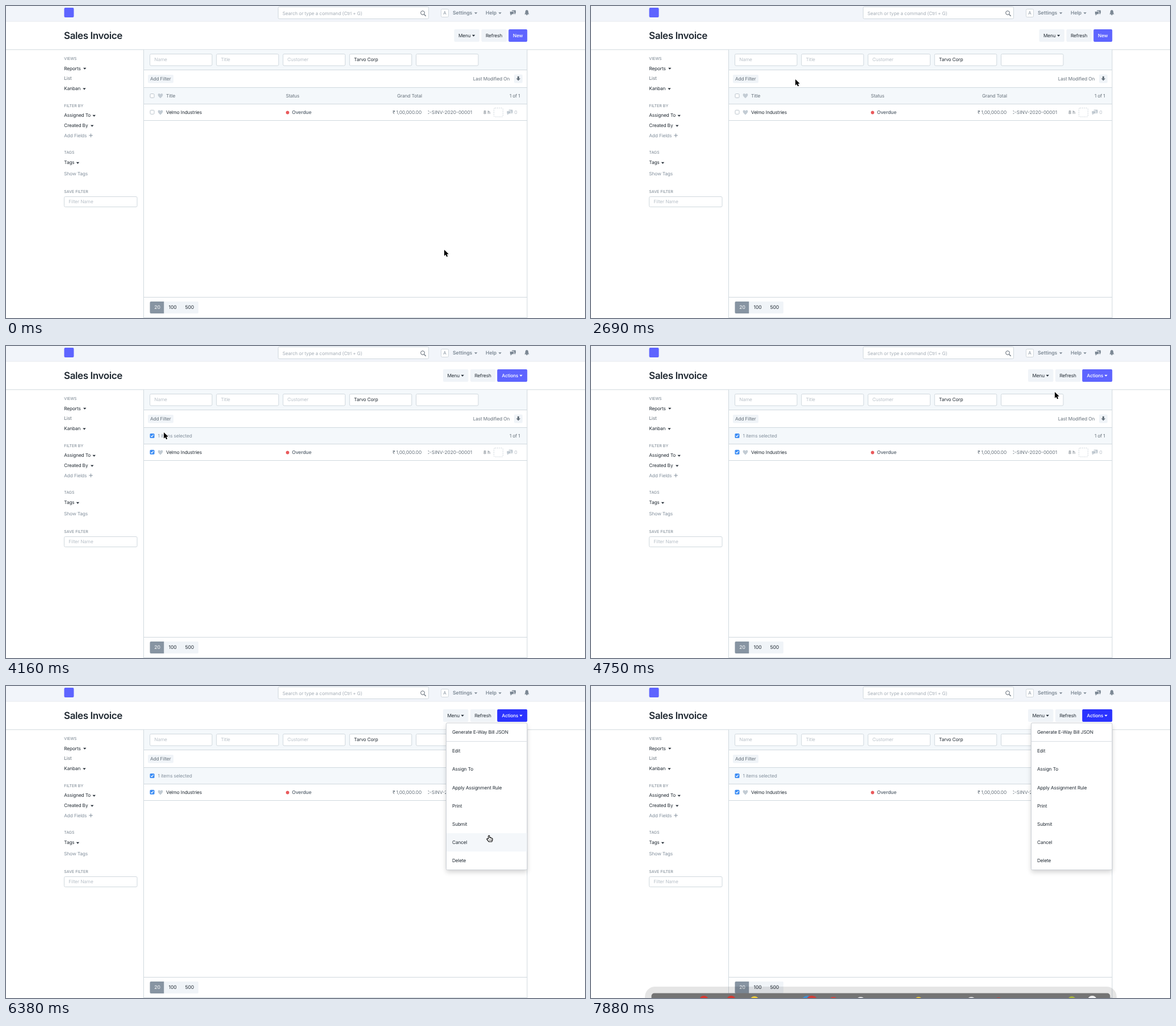
Recreate the animation shown at these times as an HTML page with a canvas. Size 1020 by 549 pixels, loop 8030 ms.

```html
<!DOCTYPE html>
<html lang="en">
<head>
<meta charset="utf-8">
<title>Sales Invoice</title>
<style>
html, body { margin: 0; width: 100%; height: 100%; overflow: hidden; background: #fff; }
canvas { display: block; width: 1020px; height: 549px; }
</style>
</head>
<body>
<canvas id="stage"></canvas>
<script>
const W = 1020, H = 549, LOOP = 8030;
const canvas = document.getElementById('stage');
const ctx = canvas.getContext('2d');
const scale = window.devicePixelRatio || 1;
canvas.width = W * scale;
canvas.height = H * scale;

const DARK = '#232c35', TEXT = '#67727c', MUTED = '#84919e', FAINT = '#b9c1c9';
const LINE = '#d0d8de', PANEL = '#f4f8fb', NAV = '#f2f5fa', GREY = '#f0f4f8';
const BLUE = '#5e64ff', HOT = '#2b33ff';

// Pointer positions: [start ms, x, y]; each holds until the next.
const POINTER = [
  [0, 772, 429], [890, 690, 381], [1040, 500, 267], [1190, 348, 174], [1340, 295, 141],
  [1640, 311, 152], [1790, 348, 172], [1940, 386, 190], [2090, 400, 196],
  [2390, 392, 180], [2540, 373, 148], [2690, 360, 129], [2830, 325, 150], [2980, 298, 170],
  [3280, 278, 163], [3430, 260, 154],
  [4020, 278, 152], [4170, 350, 142], [4310, 472, 126], [4460, 612, 108], [4600, 745, 90], [4750, 817, 81],
  [4900, 862, 62], [5050, 890, 52],
  [6080, 878, 110], [6230, 859, 216], [6380, 851, 263],
  [7580, 838, 332], [7730, 812, 470], [7880, 800, 600]
];
const ACTIONS = ['Edit', 'Assign To', 'Apply Assignment Rule', 'Print', 'Submit', 'Cancel', 'Delete'];

function box(x, y, w, h, r, fill, stroke) {
  ctx.beginPath();
  ctx.roundRect(x, y, w, h, r);
  if (fill) { ctx.fillStyle = fill; ctx.fill(); }
  if (stroke) { ctx.strokeStyle = stroke; ctx.lineWidth = 1; ctx.stroke(); }
}

function line(x1, y1, x2, y2, color = LINE, width = 1) {
  ctx.beginPath();
  ctx.moveTo(x1, y1);
  ctx.lineTo(x2, y2);
  ctx.strokeStyle = color;
  ctx.lineWidth = width;
  ctx.stroke();
}

function disc(x, y, r, fill, stroke) {
  ctx.beginPath();
  ctx.arc(x, y, r, 0, Math.PI * 2);
  if (fill) { ctx.fillStyle = fill; ctx.fill(); }
  if (stroke) { ctx.strokeStyle = stroke; ctx.lineWidth = 1; ctx.stroke(); }
}

// y is the middle of the capitals
function text(str, x, y, color = DARK, size = 8.3, weight = 400, gap = -0.15) {
  ctx.font = `${weight} ${size}px Inter, "Open Sans", sans-serif`;
  ctx.letterSpacing = gap + 'px';
  ctx.fillStyle = color;
  ctx.fillText(str, x, y + size * 0.33);
}

function shape(points, fill) {
  ctx.beginPath();
  points.forEach(([x, y]) => ctx.lineTo(x, y));
  ctx.closePath();
  ctx.fillStyle = fill;
  ctx.fill();
}

function caret(x, y, color = DARK) {
  shape([[x, y - 1.2], [x + 5.4, y - 1.2], [x + 2.7, y + 1.8]], color);
}

function heart(x, y) {
  ctx.beginPath();
  ctx.moveTo(x, y + 4.2);
  ctx.bezierCurveTo(x - 8, y - 1.5, x - 3.2, y - 6.6, x, y - 2.4);
  ctx.bezierCurveTo(x + 3.2, y - 6.6, x + 8, y - 1.5, x, y + 4.2);
  ctx.fillStyle = '#c3ccd4';
  ctx.fill();
}

function chat(x, y, color, back) {
  box(x + 3.6, y - 4.5, 7, 5.6, 1, color);
  shape([[x + 7, y], [x + 9.6, y], [x + 9.6, y + 3.2]], color);
  box(x, y - 2.6, 7.4, 5.4, 1, color, back);
  shape([[x + 1.4, y + 2], [x + 4, y + 2], [x + 1.4, y + 5]], color);
}

function bell(x, y, color) {
  ctx.beginPath();
  ctx.moveTo(x - 4.2, y + 3);
  ctx.quadraticCurveTo(x - 2.6, y + 1.5, x - 2.6, y - 1.4);
  ctx.bezierCurveTo(x - 2.6, y - 5.4, x + 2.6, y - 5.4, x + 2.6, y - 1.4);
  ctx.quadraticCurveTo(x + 2.6, y + 1.5, x + 4.2, y + 3);
  ctx.fillStyle = color;
  ctx.fill();
  disc(x, y + 3.5, 1.3, color);
}

function check(x, y, on) {
  if (!on) return box(x - 3.5, y - 3.5, 7, 7, 1.5, '#fff', '#bac3cb');
  box(x - 4, y - 4, 8, 8, 1.6, '#3b8cf4');
  ctx.beginPath();
  ctx.moveTo(x - 2.1, y + 0.1);
  ctx.lineTo(x - 0.6, y + 1.8);
  ctx.lineTo(x + 2.1, y - 2);
  ctx.strokeStyle = '#fff';
  ctx.lineWidth = 1.2;
  ctx.stroke();
}

function input(x, y, w, h, label, color = FAINT) {
  box(x, y, w, h, 2, '#fff', LINE);
  text(label, x + 7.8, y + h / 2, color);
}

function navbar() {
  const tint = '#7d8995';
  box(0, 0, W, 27, 0, NAV);
  line(0, 27, W, 27, '#e6e9ee');
  box(102.5, 3, 17, 17, 2, BLUE);
  input(479.5, 1.5, 265, 21, '');
  text('Search or type a command (Ctrl + G)', 487, 12.8, '#a5aeb7', 8.3, 400, -0.12);
  disc(734, 12, 3.4, null, '#5f6a75');
  line(736.5, 14.6, 739.6, 17.8, '#5f6a75', 1.3);
  box(766.5, 5.5, 13, 14, 2, '#fff', '#d0d7dd');
  text('A', 770.2, 12.6, MUTED, 8);
  text('Settings', 787, 12, tint, 8.7, 600, -0.05);
  caret(825, 12.4, tint);
  text('Help', 845, 12, tint, 8.7, 600, -0.05);
  caret(867.5, 12.4, tint);
  chat(887.5, 12, tint, NAV);
  bell(917.5, 11.5, tint);
}

function header(selected, hot) {
  text('Sales Invoice', 102, 52, '#1f2831', 17, 600, -0.4);
  line(0, 76.8, W, 76.8);
  const dx = selected ? -19.5 : 0;
  box(789.5 + dx, 41, 44.5, 22, 2, GREY);
  text('Menu', 797 + dx, 52.2);
  caret(821 + dx, 52);
  box(837.5 + dx, 41, 44.5, 22, 2, GREY);
  text('Refresh', 845 + dx, 52.2);
  if (selected) {
    box(865.3, 41, 53, 22, 2, hot ? HOT : BLUE);
    text('Actions', 873.5, 52.2, '#fff', 8.3, 500);
    caret(904.5, 52, '#fff');
  } else {
    box(885.3, 41, 33, 22, 2, BLUE);
    text('New', 893, 52.2, '#fff', 8.3, 500);
  }
}

function sidebar() {
  [['VIEWS', 93], ['FILTER BY', 176], ['TAGS', 258], ['SAVE FILTER', 327]]
    .forEach(([s, y]) => text(s, 102.3, y, '#76838f', 7, 400, 0));
  [['Reports', 109.8, 136], ['Kanban', 145.6, 135.3], ['Assigned To', 192.7, 152.5],
   ['Created By', 210.6, 149], ['Tags', 275.7, 123.7]].forEach(([s, y, cx]) => {
    text(s, 102.3, y);
    caret(cx, y + 0.2);
  });
  text('List', 102.3, 127, TEXT);
  text('Add Fields', 102.3, 227.8, MUTED);
  line(146.2, 227.8, 152.8, 227.8, MUTED);
  line(149.5, 224.5, 149.5, 231.1, MUTED);
  text('Show Tags', 102.3, 295, MUTED);
  input(102.5, 335.5, 128.5, 18, 'Filter Name');
}

function list(selected) {
  box(243, 77, 675, 35.5, 0, PANEL);
  ['Name', 'Title', 'Customer', 'Tarvo Corp', ''].forEach((s, i) =>
    input(253.5 + i * 117.25, 84.5, 109.5, 20.5, s, i === 3 ? DARK : FAINT));
  box(250, 121, 45, 14.5, 2, GREY);
  text('Add Filter', 254, 128.2, TEXT);
  text('Last Modified On', 822.8, 128.2, TEXT);
  box(895, 120.5, 15, 15, 2, GREY);
  box(901, 123.8, 3, 4.4, 0, TEXT);
  shape([[898.7, 127.4], [906.3, 127.4], [902.5, 131.6]], TEXT);

  box(243, 143.5, 675, 29, 0, PANEL);
  [112.5, 143.5, 172.5, 201.5, 512.5, 548.5].forEach(y => line(242, y, 918, y));
  line(242.5, 77, 242.5, H);
  line(918, 77, 918, H);

  check(257.5, 158, selected);
  if (selected) {
    text('1 items selected', 267.6, 158.2, MUTED);
  } else {
    heart(272, 158);
    text('Title', 282, 158.2, TEXT);
    text('Status', 493, 158.2, TEXT);
    text('Grand Total', 689, 158.2, TEXT);
  }
  text('1 of 1', 887, 158.2, TEXT);

  check(257.5, 186.8, selected);
  heart(272, 187.2);
  text('Velmo Industries', 282, 187.5);
  disc(496, 187.5, 2.9, '#e9595b');
  text('Overdue', 503.7, 187.3, TEXT, 8.5, 600, -0.1);
  text('₹ 1,00,000.00', 681, 187.5, TEXT);
  ctx.save();
  ctx.beginPath();
  ctx.rect(743.5, 180, 100, 16);
  ctx.clip();
  ctx.textAlign = 'right';
  text('ACC-SINV-2020-00001', 821.2, 187.5, TEXT, 8.3, 400, 0);
  ctx.restore();
  text('8 h', 841, 187.5, TEXT);
  ctx.setLineDash([2, 1.5]);
  box(859.5, 179.5, 16, 15.5, 2, null, '#cfd6dc');
  ctx.setLineDash([]);
  chat(882, 187, '#c0c9d1', '#fff');
  text('0', 895.5, 187.5, FAINT);

  box(253.5, 520, 25, 21, [2, 0, 0, 2], '#8794a2');
  box(278.5, 520, 60.5, 21, [0, 2, 2, 0], GREY);
  text('20', 261.3, 530.6, '#fff', 8.6);
  text('100', 286.6, 530.6, DARK, 8.6);
  text('500', 315.6, 530.6, DARK, 8.6);
}

function menu(px, py) {
  ctx.save();
  ctx.shadowColor = 'rgba(0,0,0,.18)';
  ctx.shadowBlur = 9 * scale;
  ctx.shadowOffsetY = 4 * scale;
  box(775.5, 65, 142.5, 258.5, 2, '#fff');
  ctx.restore();
  box(775.5, 65, 142.5, 258.5, 2, '#fff', '#cbcfd4');
  const over = px > 775 && px < 918 ? Math.floor((py - 98) / 32.2) : -1;
  if (over >= 0 && over < ACTIONS.length) box(776, 98 + over * 32.2, 141.5, 32.2, 0, '#f4f7fa');
  text('Generate E-Way Bill JSON', 786, 81.6);
  line(776, 97.5, 917.5, 97.5, '#d8dde2');
  ACTIONS.forEach((s, i) => text(s, 786, 114.4 + i * 32.2));
}

function arrow(x, y) {
  ctx.beginPath();
  [[0, 0], [0, 10.8], [2.5, 8.5], [4.2, 12.3], [6.2, 11.4], [4.5, 7.8], [7.8, 7.6]]
    .forEach(([a, b]) => ctx.lineTo(x + a, y + b));
  ctx.closePath();
  ctx.lineJoin = 'round';
  ctx.strokeStyle = '#fff';
  ctx.lineWidth = 1.5;
  ctx.stroke();
  ctx.fillStyle = '#000';
  ctx.fill();
}

function hand(x, y) {
  ctx.save();
  ctx.translate(x, y);
  ctx.beginPath();
  ctx.moveTo(-1.3, 6);
  ctx.lineTo(-1.3, 1);
  ctx.quadraticCurveTo(0, -1, 1, 1);
  ctx.lineTo(1, 4);
  ctx.quadraticCurveTo(2.2, 3, 3, 4.4);
  ctx.quadraticCurveTo(4.3, 3.7, 4.9, 5.2);
  ctx.quadraticCurveTo(6.3, 4.8, 6.2, 6.6);
  ctx.quadraticCurveTo(6.2, 9, 4.8, 11);
  ctx.lineTo(-0.4, 11);
  ctx.quadraticCurveTo(-2.3, 9, -4, 6.6);
  ctx.quadraticCurveTo(-4, 4.7, -1.3, 6);
  ctx.closePath();
  ctx.lineJoin = 'round';
  ctx.fillStyle = '#fff';
  ctx.fill();
  ctx.strokeStyle = '#000';
  ctx.lineWidth = 1.1;
  ctx.stroke();
  [0.8, 2.7, 4.5].forEach(a => line(a, 7, a, 9.3, '#000', 0.7));
  ctx.restore();
}

function dock() {
  box(95, 529, 831, 40, 18, 'rgba(0,0,0,.1)');
  box(106.5, 540.5, 808, 30, 5, '#747474');
  const apps = [
    [199, 553, 8, '#d8382f'], [247, 553, 8, '#d8382f'], [288, 554, 8, '#f2cf3c'],
    [381, 555, 10, '#3f8fd0'], [389, 556, 11, '#d23d36'], [427, 555, 8, '#d8453c'],
    [475, 555, 8, '#e8e8e8'], [577, 554, 7, '#efc93f'], [670, 555, 8, '#dedede'],
    [718, 556, 8, '#c9463f'], [847, 553, 7, '#a9b63c'], [883, 553, 8, '#f1f1f1']
  ];
  apps.forEach(([x, y, r, color]) => disc(x, y, r, color));
}

function draw(t) {
  const [, px, py] = POINTER.filter(k => k[0] <= t).pop();
  const selected = t >= 3870, open = t >= 5340;
  const onButton = selected && px > 865 && px < 918 && py > 41 && py < 63;
  const inMenu = open && px > 775 && px < 918 && py > 65 && py < 323;

  ctx.setTransform(scale, 0, 0, scale, 0, 0);
  ctx.textRendering = 'geometricPrecision';
  ctx.fillStyle = '#fff';
  ctx.fillRect(0, 0, W, H);
  navbar();
  header(selected, open || onButton);
  sidebar();
  list(selected);
  if (open) menu(px, py);
  if (t >= 7880) dock();

  if (t >= 3720 && t < 3870) disc(261, 155, 7.4, PANEL, '#111');
  if (t >= 5190 && t < 5340) disc(890, 53, 7.4, null, '#111');
  (onButton || inMenu ? hand : arrow)(px, py);
}

function tick() {
  draw(performance.now() % LOOP);
  requestAnimationFrame(tick);
}
tick();
</script>
</body>
</html>
```
